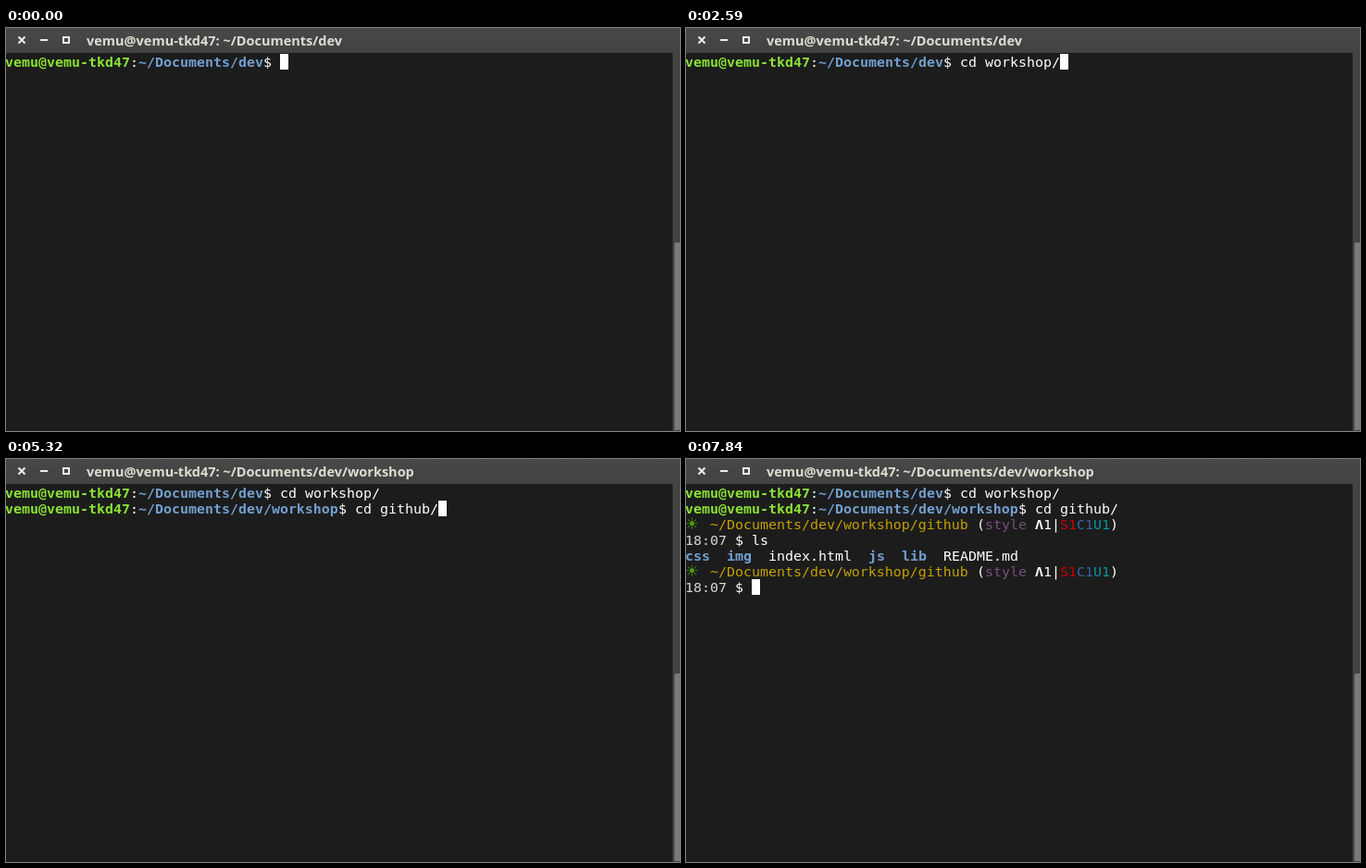
Animation of 728 by 436 pixels, one loop 8 s. Source, as an HTML page:

```html
<!DOCTYPE html>
<html lang="en">
<head>
<meta charset="utf-8">
<title>Terminal</title>
<style>
  html, body { margin: 0; width: 100%; height: 100%; overflow: hidden; background: #1c1c1c; }
  svg { display: block; }
  text { white-space: pre; }
  #title { font: bold 14.5px "Open Sans", "Noto Sans", sans-serif; fill: #dfdbd2; }
  #screen { font: 14.95px "DejaVu Sans Mono", monospace; fill: #fff; }
  .user { fill: #8ae234; font-weight: bold; }
  .dir { fill: #729fcf; font-weight: bold; }
  .sun { fill: #4e9a06; font: 17px "DejaVu Sans", sans-serif; }
  .path { fill: #c4a000; }
  .branch { fill: #75507b; }
  .ahead { font-weight: bold; }
  .staged { fill: #c00; }
  .changed { fill: #3465a4; }
  .untracked { fill: #06989a; }
  .clock { fill: #d3d7cf; }
</style>
</head>
<body>
<svg width="728" height="436" viewBox="0 0 728 436">
  <defs>
    <linearGradient id="bar" x2="0" y2="1">
      <stop stop-color="#484848"/>
      <stop offset="1" stop-color="#424242"/>
    </linearGradient>
  </defs>
  <rect width="728" height="436" fill="#1c1c1c"/>
  <rect x="720" y="27" width="8" height="409" fill="#434343"/>
  <path d="M722 435V234q0-2 2-2H728V435Z" fill="#7a7a7a"/>
  <rect width="728" height="27" fill="url(#bar)"/>
  <g fill="none" stroke="#efedea" stroke-width="2">
    <path d="M13.5 9.5l7 7m0-7l-7 7M37 13h8"/>
    <rect x="62" y="10" width="6" height="6"/>
  </g>
  <text id="title" x="87" y="19"></text>
  <g id="screen"></g>
  <rect id="cursor" width="9" height="17" fill="#fff"/>
</svg>
<script>
const CELL = 9, ROW = 17, LEFT = -1, TOP = 28, BASELINE = 14;
const LOOP = 8000, FRAME = 70, BLINK = 600;
const $ = id => document.getElementById(id);

const host = 'vemu@vemu-tkd47';
const home = '~/Documents/dev';
const workshop = home + '/workshop';

// Output is a list of [class, text] parts; '\n' starts a new row.
const newline = ['', '\n'];
const shellPrompt = path => [['user', host], ['', ':'], ['dir', path], ['', '$ ']];
const gitPrompt = [
  ['sun', '\u2600'], ['path', '  ' + workshop + '/github'], ['', ' ('],
  ['branch', 'style'], ['', ' '], ['ahead', '\u039B'], ['', '1|'],
  ['staged', 'S1'], ['changed', 'C1'], ['untracked', 'U1'], ['', ')'], newline,
  ['clock', '18:07'], ['', ' $ ']
];
const listing = [
  ['dir', 'css  img'], ['', '  index.html  '], ['dir', 'js  lib'], ['', '  README.md'], newline
];

// Bursts of [start, gap, chunks]: strings are keys, lists are output.
const session = [
  [-300, 0, ['', shellPrompt(home)]],
  [770, 0, ['']],
  [790, 280, [...'cd ']],
  [2310, 140, ['w', 'o', 'rkshop/', '']],
  [3240, 0, ['\n', shellPrompt(workshop)]],
  [4200, 280, [...'cd ']],
  [5040, 140, ['g', 'i', 'thub/']],
  [6230, 0, ['\n']],
  [6370, 0, [gitPrompt]],
  [7350, 140, [...'ls']],
  [7840, 0, ['\n', listing, gitPrompt]]
];
const events = session.flatMap(([at, gap, chunks]) =>
  chunks.map((chunk, i) => ({ at: at + i * gap, chunk })));

function draw(time) {
  let row = 0, col = 0, lastKey = 0, open = null;
  const texts = [];

  const write = ([kind, content]) => {
    if (content === '\n') {
      row++;
      col = 0;
      open = null;
    } else {
      if (open?.kind === kind) open.content += content;
      else texts.push(open = { kind, content, row, col });
      col += content.length;
    }
  };

  for (const { at, chunk } of events.filter(event => event.at <= time)) {
    if (typeof chunk === 'string') {
      lastKey = at;
      write(['', chunk]);
    } else {
      chunk.forEach(write);
    }
  }

  $('screen').replaceChildren(...texts.map(part => {
    const text = document.createElementNS('http://www.w3.org/2000/svg', 'text');
    text.setAttribute('x', LEFT + part.col * CELL);
    text.setAttribute('y', TOP + part.row * ROW + BASELINE);
    text.setAttribute('class', part.kind);
    text.textContent = part.content;
    return text;
  }));
  $('cursor').setAttribute('x', LEFT + col * CELL);
  $('cursor').setAttribute('y', TOP + row * ROW);
  $('cursor').setAttribute('visibility', time - lastKey < BLINK ? 'visible' : 'hidden');
  $('title').textContent = `${host}: ${row ? workshop : home}`;
}

const start = performance.now();
let shown = -1;
function tick(now) {
  const frame = Math.floor(Math.max(0, now - start) % LOOP / FRAME);
  if (frame !== shown) draw((shown = frame) * FRAME);
  requestAnimationFrame(tick);
}
tick(start);
</script>
</body>
</html>
```
